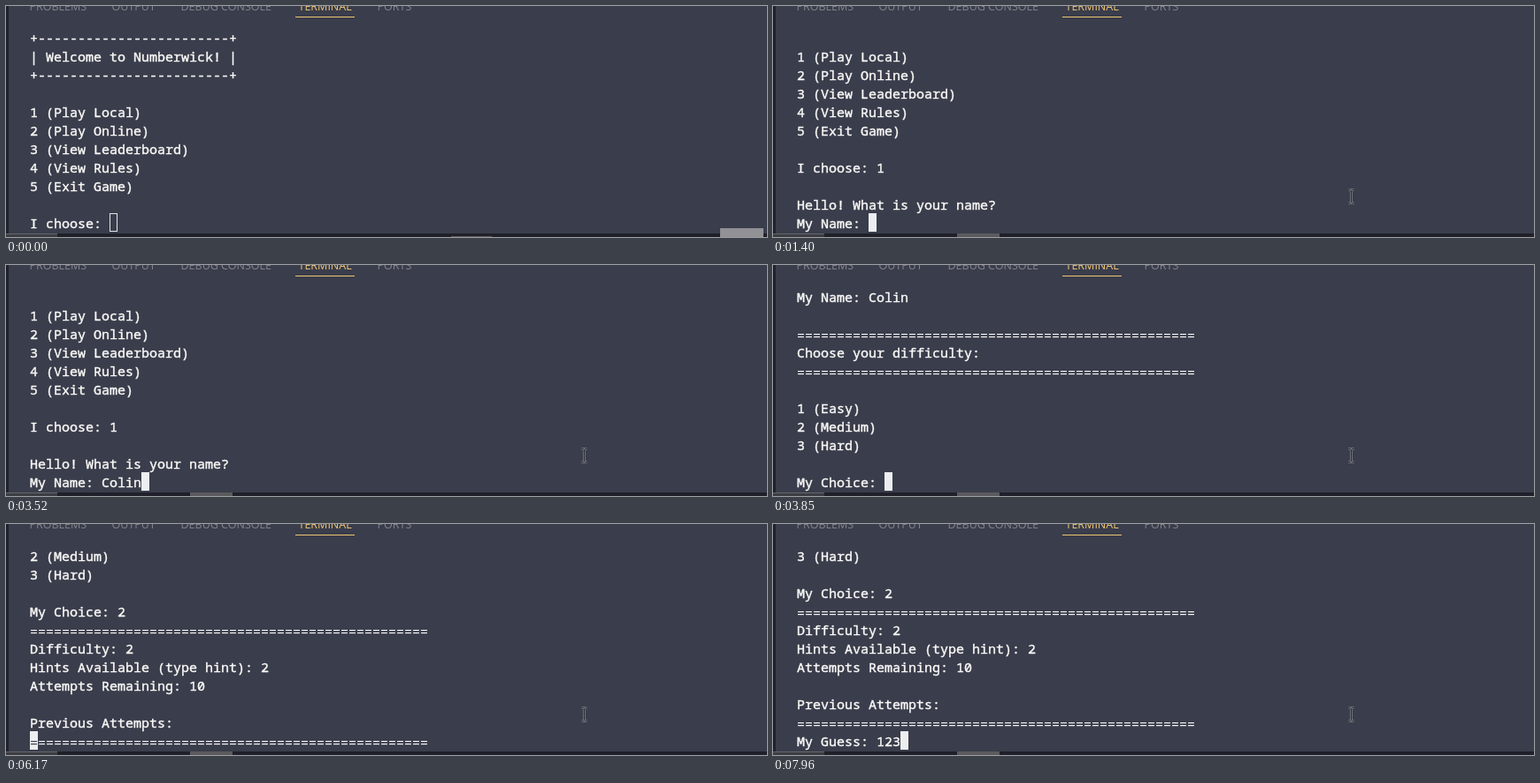
Recreate the animation shown at these times as an HTML page. Size 860x262 px, loop 8000 ms.

```html
<!DOCTYPE html>
<html lang="en">
<head>
<meta charset="utf-8">
<title>Terminal game</title>
<style>
  html, body { margin: 0; width: 100%; height: 100%; overflow: hidden; background: #3a3d4b; }
  svg { display: block; }
  text { white-space: pre; }
  #tabs { font: 12.5px "Open Sans", sans-serif; fill: #83858e; }
  .mono { font: 15px "Noto Sans Mono", monospace; font-variant-ligatures: none; }
  #rows { fill: #fafaf8; stroke: #fafaf8; stroke-width: .4px; }
  #under { fill: #3a3d4b; }
  .rule { stroke: none; transform: translateY(1px); }
</style>
</head>
<body>
<svg width="860" height="262" viewBox="0 0 860 262">
  <rect width="860" height="262" fill="#3a3d4b"/>
  <rect width="3" height="262" fill="#20212b"/>
  <g id="tabs">
    <text x="26.5" y="5">PROBLEMS</text>
    <text x="119.5" y="5">OUTPUT</text>
    <text x="197.5" y="5">DEBUG CONSOLE</text>
    <text x="330.5" y="5" fill="#f0c674">TERMINAL</text>
    <text x="419.5" y="5">PORTS</text>
  </g>
  <rect x="327" y="12" width="67" height="1" fill="#f0c674"/>
  <g id="rows" class="mono"></g>
  <rect id="caret" width="9" height="21"/>
  <text id="under" class="mono rule"></text>
  <rect y="258" width="860" height="4" fill="#1f2029"/>
  <rect y="258" width="58" height="4" fill="#3c3d43"/>
  <rect y="258" width="58" height="1" fill="#66676b"/>
  <rect id="task" height="4" fill="#5b5b5e"/>
  <rect id="panel" x="807" y="252" width="49" height="10" fill="#919196"/>
  <g id="mouse" fill="none">
    <path id="beam" d="M-3-7.5h2l1 1 1-1h2M0-6.5v13M-3 7.5h2l1-1 1 1h2" stroke="#7d7e86" stroke-width="2.6"/>
    <path d="M-3-7.5h2l1 1 1-1h2M0-6.5v13M-3 7.5h2l1-1 1 1h2" stroke="#2b2c35"/>
  </g>
</svg>
<script>
const LOOP = 8000, ROWS = 11, LEFT = 27, TOP = 25, CW = 9, LH = 21;
const FOCUS_AT = 470;
const edge = '+' + '-'.repeat(24) + '+';
const rule = '='.repeat(50);

// Each step appends to the terminal; \r sends the caret back to column 0.
const steps = [
  [0, [edge, '| Welcome to Numberwick! |', edge, '', '1 (Play Local)', '2 (Play Online)',
       '3 (View Leaderboard)', '4 (View Rules)', '5 (Exit Game)', '', 'I choose: '].join('\n')],
  [1200, '1'],
  [1400, '\n\nHello! What is your name?\nMy Name: '],
  [2260, 'C'], [2860, 'o'], [3320, 'l'], [3420, 'i'], [3520, 'n'],
  [3790, '\n'],
  [3850, ['', rule, 'Choose your difficulty:', rule, '', '1 (Easy)', '2 (Medium)', '3 (Hard)',
          '', 'My Choice: '].join('\n')],
  [5370, '2'],
  [5500, '\n'],
  [6170, [rule, 'Difficulty: 2', 'Hints Available (type hint): 2', 'Attempts Remaining: 10', '',
          'Previous Attempts:', rule + '\r'].join('\n')],
  [6230, '\nMy Guess: '],
  [7560, '1'], [7760, '2'], [7960, '3']
];

// Pointer positions: time, x, y
const moves = [[70, 812, 250], [150, 748, 232], [230, 694, 218], [310, 664, 213], [390, 653, 216]];

const $ = id => document.getElementById(id);
const set = (el, attrs) => { for (const k in attrs) el.setAttribute(k, attrs[k]); };
const baseline = row => TOP + row * LH + 17;

const rows = Array.from({ length: ROWS }, (_, i) => {
  const t = document.createElementNS('http://www.w3.org/2000/svg', 'text');
  set(t, { x: LEFT, y: baseline(i) });
  return $('rows').appendChild(t);
});

function drawTerminal(time, focused) {
  const log = steps.filter(s => s[0] <= time).map(s => s[1]).join('');
  const lines = log.split('\n').slice(-ROWS);
  const last = lines[ROWS - 1];
  const col = last.endsWith('\r') ? 0 : last.length;
  lines.forEach((line, i) => {
    rows[i].textContent = line.replace('\r', '');
    rows[i].classList.toggle('rule', line.startsWith(rule));
  });

  const x = LEFT + col * CW, y = TOP + (ROWS - 1) * LH;
  set($('caret'), focused
    ? { x, y, width: CW, height: LH, fill: '#eceeef', stroke: 'none' }
    : { x: x + .5, y: y + .5, width: CW - 1, height: LH - 1, fill: 'none', stroke: '#e4e5e6' });
  set($('under'), { x, y: baseline(ROWS - 1) });
  $('under').textContent = last[col] || '';
}

function drawDesktop(time, focused) {
  set($('task'), focused ? { x: 208, y: 258, width: 48 } : { x: 503, y: 261, width: 46 });
  set($('panel'), { visibility: time < moves[0][0] ? 'visible' : 'hidden' });
  const at = moves.filter(m => m[0] <= time).pop();
  set($('mouse'), at
    ? { visibility: 'visible', transform: `translate(${at[1] + .5} ${at[2]})` }
    : { visibility: 'hidden' });
}

const start = performance.now();
function tick() {
  const time = (performance.now() - start) % LOOP;
  const focused = time >= FOCUS_AT;
  drawTerminal(time, focused);
  drawDesktop(time, focused);
  requestAnimationFrame(tick);
}
tick();
</script>
</body>
</html>
```
